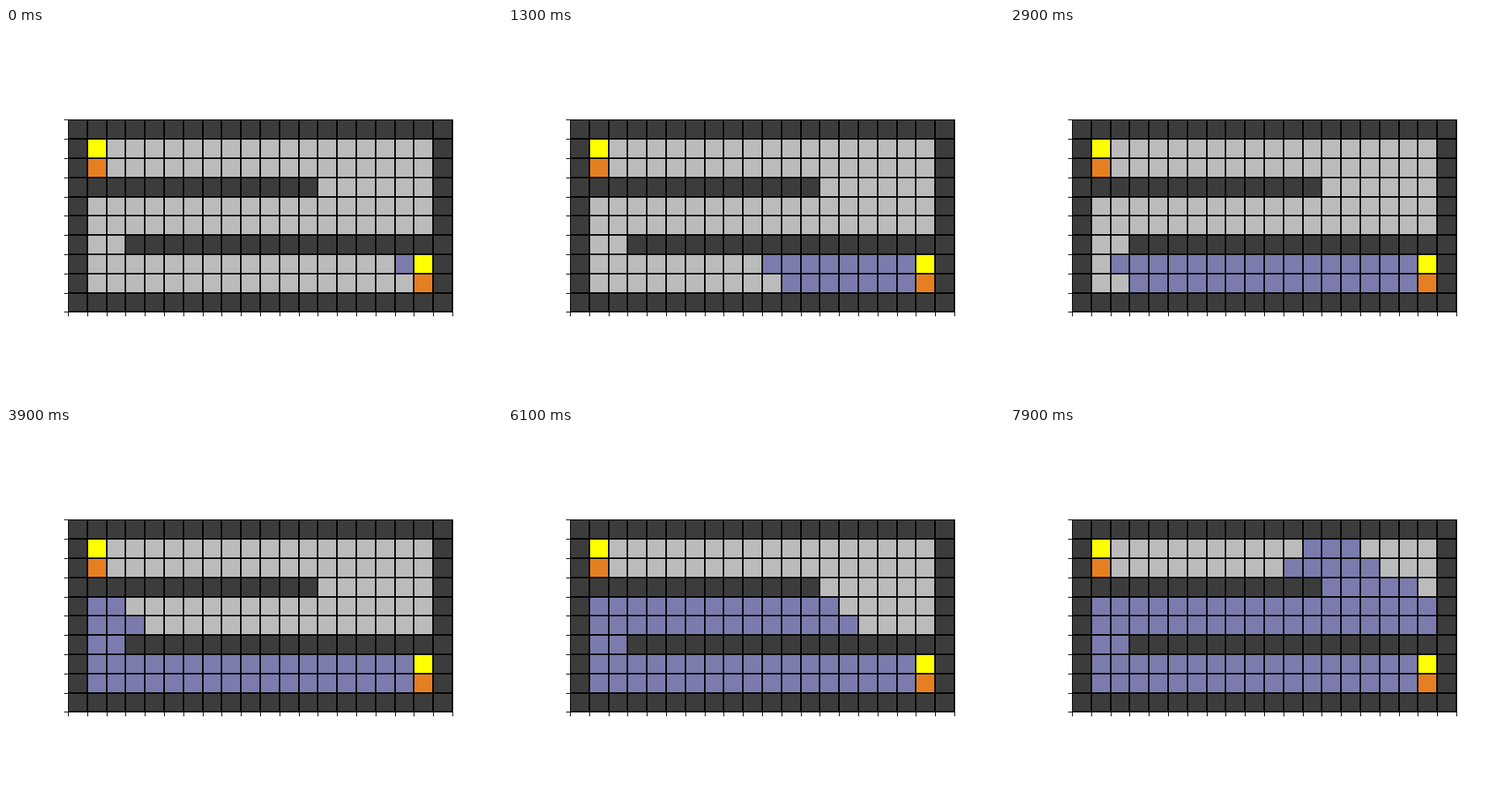
Animation, 640 px wide and 480 px high, one loop 8 s. Source, as an HTML page with a canvas:

```html
<!DOCTYPE html>
<html>
<head>
<meta charset="utf-8">
<style>
html, body { margin: 0; width: 100%; height: 100%; overflow: hidden; background: #fff; }
canvas { display: block; }
</style>
</head>
<body>
<canvas id="stage" width="640" height="480"></canvas>
<script>
const ctx = document.getElementById('stage').getContext('2d');
const COLS = 20, ROWS = 10, CELL = 24.8, LEFT = 80, TOP = 118.4;
const STEP = 100, LOOP = 8000;
const WALL = '#3c3c3c', FLOOR = '#bbbbbb', SEEN = '#7b7bad', HEAD = '#ffff00', BODY = '#e67e22';

const gx = c => Math.round(LEFT + c * CELL);
const gy = r => Math.round(TOP + r * CELL);
const key = (r, c) => r * COLS + c;

const isWall = (r, c) =>
  r === 0 || r === ROWS - 1 || c === 0 || c === COLS - 1 ||
  (r === 3 && c < 13) || (r === 6 && c > 2);

const markers = new Map([
  [key(1, 1), HEAD], [key(2, 1), BODY], [key(7, 18), HEAD], [key(8, 18), BODY]
]);

// Breadth-first search expanding one cell per step; the start may be queued again.
function search(steps) {
  const foundAt = new Map(), queue = [[7, 18]];
  for (let step = 0; step < steps && queue.length; step++) {
    const [r, c] = queue.shift();
    for (const [dr, dc] of [[0, -1], [0, 1], [-1, 0], [1, 0]]) {
      const nr = r + dr, nc = c + dc, k = key(nr, nc);
      if (isWall(nr, nc) || markers.get(k) === BODY || foundAt.has(k)) continue;
      foundAt.set(k, step);
      queue.push([nr, nc]);
    }
  }
  return foundAt;
}

const foundAt = search(LOOP / STEP);

function cellColor(r, c, step) {
  const k = key(r, c);
  if (isWall(r, c)) return WALL;
  return markers.get(k) || (foundAt.get(k) <= step ? SEEN : FLOOR);
}

function draw(step) {
  ctx.fillStyle = '#fff';
  ctx.fillRect(0, 0, 640, 480);
  const x0 = gx(0), y0 = gy(0), w = gx(COLS) - x0 + 1, h = gy(ROWS) - y0 + 1;

  ctx.save();
  ctx.beginPath();
  ctx.rect(x0, y0, w, h);
  ctx.clip();
  for (let r = 0; r < ROWS; r++)
    for (let c = 0; c < COLS; c++) {
      ctx.fillStyle = cellColor(r, c, step);
      ctx.fillRect(gx(c), gy(r), gx(c + 1) - gx(c), gy(r + 1) - gy(r));
    }
  ctx.fillStyle = '#000';
  for (let c = 0; c <= COLS; c++) ctx.fillRect(gx(c) - 1, y0, 2, h);
  for (let r = 0; r <= ROWS; r++) ctx.fillRect(x0, gy(r) - 1, w, 2);
  ctx.restore();

  // Axis ticks
  ctx.fillStyle = '#000';
  for (let c = 0; c <= COLS; c++) ctx.fillRect(gx(c), y0 + h, 1, 5);
  for (let r = 0; r <= ROWS; r++) ctx.fillRect(x0 - 5, gy(r), 5, 1);
}

const start = performance.now();
function tick() {
  draw(Math.floor(((performance.now() - start) % LOOP) / STEP));
  requestAnimationFrame(tick);
}
tick();
</script>
</body>
</html>
```
